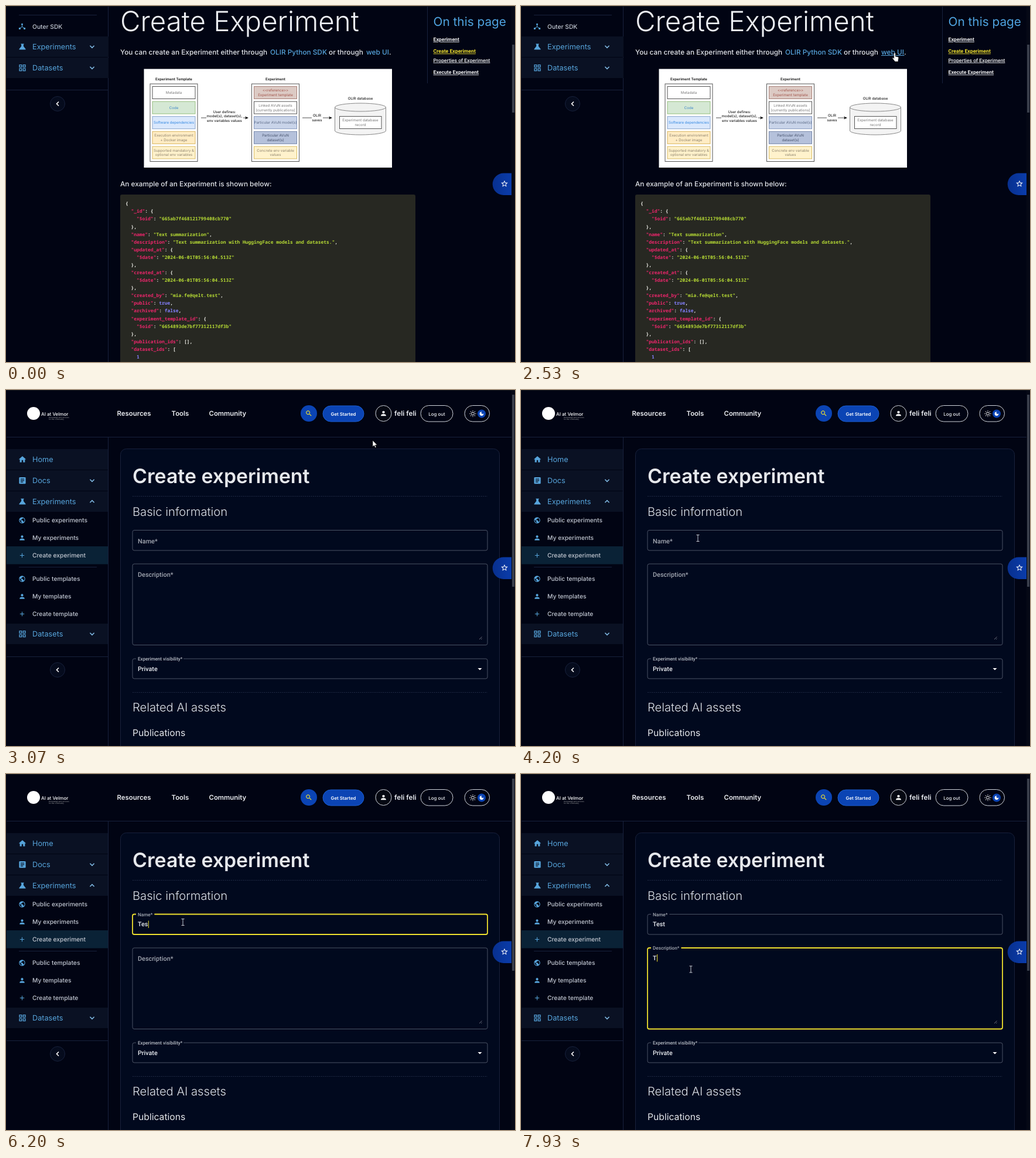
Animation, 869 px wide and 608 px high, one loop 8 s. Source, as an HTML page:

```html
<!DOCTYPE html>
<html lang="en">
<head>
<meta charset="utf-8">
<title>Create experiment</title>
<style>
  html, body { margin: 0; width: 100%; height: 100%; overflow: hidden; background: #02040f; }
  svg { display: block; width: 869px; height: 608px; font-family: Inter, "Open Sans", sans-serif; text-rendering: geometricPrecision; }
  .form { font-family: Roboto, sans-serif; }
  .code { font-family: "Noto Sans Mono", monospace; font-weight: 600; white-space: pre; }
  .mid { text-anchor: middle; }
  .link { text-decoration: underline; }
</style>
</head>
<body>
<svg id="stage" viewBox="0 0 869 608"></svg>
<script>
const PAGE = '#010413', CARD = '#01091e', ROW = '#0a1123', LINE = '#18213c';
const BLUE = '#57a5dc', PALE = '#c3c8d2', YELLOW = '#f0e02f';

const ICONS = {
  home: 'M10 20v-6h4v6h5v-8h3L12 3 2 12h3v8z',
  doc: 'M5 3h14a2 2 0 012 2v14a2 2 0 01-2 2H5a2 2 0 01-2-2V5a2 2 0 012-2zm2 4v2h10V7zm0 4v2h10v-2zm0 4v2h7v-2z',
  flask: 'M20.8 18.4L15 10.7V6.5l1.4-1.7c.2-.3 0-.8-.4-.8H8c-.4 0-.6.5-.4.8L9 6.5v4.2l-5.8 7.7c-.5.7 0 1.6.8 1.6h16c.8 0 1.3-.9.8-1.6z',
  grid: 'M3 3h8v8H3zm2 2v4h4V5zM3 13h8v8H3zm2 2v4h4v-4zM13 3h8v8h-8zm2 2v4h4V5zM13 13h8v8h-8zm2 2v4h4v-4z',
  info: 'M12 2a10 10 0 100 20 10 10 0 000-20zm1 15h-2v-6h2zm0-8h-2V7h2z',
  shapes: 'M12 2l-5.5 9h11zM17.5 13a4.5 4.5 0 100 9 4.5 4.5 0 000-9zM3 13.5h8v8H3z',
  board: 'M3 13h8V3H3zm0 8h8v-6H3zm10 0h8V11h-8zm0-18v6h8V3z',
  scope: 'M5 21a2 2 0 012-2h4v-2H9a4 4 0 01-1.5-7.5L9 12h1l-1 2h9a3 3 0 01-3 3h-2v2h4a2 2 0 012 2zM8 4l4-2 4 9-4 2z',
  play: 'M12 2a10 10 0 100 20 10 10 0 000-20zm-2 14.5v-9l6 4.5z',
  globe: 'M12 2a10 10 0 100 20 10 10 0 000-20zm-1 18c-4-.5-7-3.9-7-8 0-.6.1-1.2.2-1.8L9 15v1a2 2 0 002 2zm6.9-2.6c-.3-.8-1-1.4-1.9-1.4h-1v-3a1 1 0 00-1-1H8v-2h2a1 1 0 001-1V7h2a2 2 0 002-2v-.4c2.9 1.2 5 4 5 7.4 0 2-.8 4-2.1 5.4z',
  person: 'M12 12a4 4 0 100-8 4 4 0 000 8zm0 2c-2.7 0-8 1.3-8 4v2h16v-2c0-2.7-5.3-4-8-4z',
  plus: 'M19 13h-6v6h-2v-6H5v-2h6V5h2v6h6z',
  search: 'M15.5 14h-.8l-.3-.3A6.5 6.5 0 109.5 16c1.6 0 3.1-.6 4.2-1.6l.3.3v.8l5 5 1.5-1.5zm-6 0a4.5 4.5 0 110-9 4.5 4.5 0 010 9z',
  hub: 'M12 2a3 3 0 011 5.8v4l5.5 4.4a3 3 0 11-1.3 1.5L12 13.5l-5.2 4.2a3 3 0 11-1.3-1.5L11 11.8v-4A3 3 0 0112 2z',
  star: 'M22 9.2l-7.2-.6L12 2 9.2 8.6 2 9.2 7.5 14 5.8 21 12 17.3 18.2 21l-1.7-7zM12 15.4l-3.8 2.3 1-4.3-3.3-2.9 4.4-.4L12 6.1l1.7 4 4.4.4-3.3 2.9 1 4.3z',
  moon: 'M12 3a9 9 0 109 9c0-.5 0-.9-.1-1.4A5.4 5.4 0 1113.4 3.1 9 9 0 0012 3z'
};

const text = (x, y, s, size, fill, more = '') => `<text x="${x}" y="${y}" font-size="${size}" fill="${fill}" ${more}>${s}</text>`;
const rect = (x, y, w, h, fill, more = '') => `<rect x="${x}" y="${y}" width="${w}" height="${h}" fill="${fill}" ${more}/>`;
const circle = (x, y, r, fill, stroke = 'none') => `<circle cx="${x}" cy="${y}" r="${r}" fill="${fill}" stroke="${stroke}"/>`;
const path = (d, stroke, more = '') => `<path d="${d}" fill="none" stroke="${stroke}" ${more}/>`;
const icon = (name, x, y, size, fill) =>
  `<path d="${ICONS[name]}" fill="${fill}" fill-rule="evenodd" transform="translate(${x - size / 2} ${y - size / 2}) scale(${size / 24})"/>`;
const weight = n => `font-weight="${n}"`;

// Sidebar
const menuRow = (y, name, label) =>
  rect(1, y - 17.5, 174, 35, ROW) + icon(name, 28, y, 15, BLUE) + text(45, y + 4.7, label, 12.7, BLUE);
const menuItem = (y, name, label) =>
  icon(name, 27.5, y, 12.5, BLUE) + text(45, y + 3.7, label, 10.3, PALE, weight(500));
const chevron = (y, id = '') =>
  `<g transform="translate(147 ${y})">${path('M-3.6-1.8L0 1.8 3.6-1.8', '#7fb8e2', `id="${id}" stroke-width="1.6"`)}</g>`;
const collapser = y => circle(88, y, 12.5, '#050b1d', LINE) + path(`M90 ${y - 3.5}l-3.5 3.5 3.5 3.5`, '#fff', 'stroke-width="1.6"');

// Parts shared by both pages
const frame = (thumbY, thumbH) =>
  rect(863, 1, 5, 607, '#060916') + rect(864, thumbY, 4, thumbH, '#3a3f4c') +
  '<path d="M863 285.5h-13.5a18.7 18.7 0 000 37.5H863z" fill="url(#tab)"/>' + icon('star', 851, 303.5, 14, '#fff');

// Documentation page
const CODE = `{
  "_id": {
    "$oid": "665ab7f468121799408cb770"
  },
  "name": "Text summarization",
  "description": "Text summarization with HuggingFace models and datasets.",
  "updated_at": {
    "$date": "2024-06-01T05:56:04.513Z"
  },
  "created_at": {
    "$date": "2024-06-01T05:56:04.513Z"
  },
  "created_by": "mia.fe@qelt.test",
  "public": true,
  "archived": false,
  "experiment_template_id": {
    "$oid": "6654893de7bf77312117df3b"
  },
  "publication_ids": [],
  "dataset_ids": [
    1`;
const span = (fill, s) => `<tspan fill="${fill}">${s}</tspan>`;
const paint = line => line.replace(/("[^"]*")(:?)|\b(true|false|\d+)\b/g, (all, str, colon, value) =>
  value ? span('#8580ff', value) : span(colon ? '#ee266c' : '#b4d834', str) + colon);
const codeBlock = () => CODE.split('\n').map((line, i) =>
  text(204, 340.3 + i * 13.08, paint(line), 7.95, '#f4f4ee', 'class="code"')).join('');

const label = (x, y, lines, fill = '#222', bold = 500) => lines.split('|').map((s, i, all) =>
  text(x, y + 2.2 + (i - (all.length - 1) / 2) * 7.6, s, 6.15, fill, `class="mid" ${weight(bold)}`)).join('');
const column = (x, title, cells) =>
  label(x, 125, title, '#111', 600) + rect(x - 40.5, 133, 81, 132.5, '#fff', 'stroke="#555"') +
  cells.map(([s, fill, stroke, ink = '#777'], i) =>
    rect(x - 36.5, 137.5 + i * 25.6, 73, 21, fill, `stroke="${stroke}"`) + label(x, 148 + i * 25.6, s, ink, 400)).join('');
const arrow = (x1, x2, x3, x4) =>
  path(`M${x1} 191H${x2}M${x3} 191H${x4}`, '#222', 'stroke-width=".8"') + `<path d="M${x4 + 2} 191l-6-2.5 1.5 2.5-1.5 2.5z"/>`;
const diagram = () =>
  rect(235.5, 107.5, 423.5, 168.5, '#fff') +
  column(286.5, 'Experiment Template', [
    ['Metadata', '#fff', '#555'], ['Code', '#d5e8d4', '#94bd7c', '#3a83c8'],
    ['Software dependencies', '#dae8fc', '#86a3cd', '#2f86e0'],
    ['Execution environment|+ Docker image', '#ffecc4', '#d9b45c', '#8c826c'],
    ['Supported mandatory &amp;|optional env variables', '#fff2cc', '#d9bc66', '#8c826c']]) +
  column(460, 'Experiment', [
    ['&lt;&lt;reference&gt;&gt;|Experiment template', '#dccac4', '#a88078', '#a2554b'],
    ['Linked AVuN assets|(currently publications)', '#fff', '#555'],
    ['Particular AVuN model(s)', '#c9d4e9', '#8497bd', '#5d6c88'],
    ['Particular AVuN|dataset(s)', '#b5c1db', '#7787aa', '#46526c'],
    ['Concrete env variable|values', '#fff2cc', '#d9bc66', '#8c826c']]) +
  arrow(333, 342, 405, 412) + label(373, 188, 'User defines:|model(s), dataset(s),|env variables values') +
  arrow(506, 522, 541, 555) + label(531, 191, 'OLIR|saves') + label(605, 158, 'OLIR database') +
  '<path d="M561.5 173V213A43.5 7 0 00648.5 213V173" fill="#f3f3f3" stroke="#888"/>' +
  '<ellipse cx="605" cy="173" rx="43.5" ry="7" fill="#f3f3f3" stroke="#888"/>' +
  rect(569.5, 188.5, 71.5, 21, '#fff', 'stroke="#555"') + label(605, 199, 'Experiment database|record', '#777', 400);

const prose = (x, y, s, fill = '#e4e6ea') => text(x, y, s, 11.8, fill, weight(500));
const toc = (y, s, fill, bold) => text(729.5, y, s, 8.7, fill, `class="form link" ${weight(bold)}`);
const docsPage = () =>
  path('M22 15.5H155M1 143.5H175M174.5 0V608M719.5 0V132', LINE) +
  menuItem(35, 'hub', 'Outer SDK') + menuRow(69.5, 'flask', 'Experiments') + menuRow(105.5, 'grid', 'Datasets') +
  chevron(69.5) + chevron(105.5) + collapser(167) +
  text(195, 43, 'Create Experiment', 47.4, '#eceef2', weight(300)) +
  prose(195, 82.7, 'You can create an Experiment either through') + prose(451, 82.7, 'OLIR Python SDK', BLUE) +
  prose(551, 82.7, 'or through') + prose(615, 82.7, 'web UI', BLUE) + prose(654, 82.7, '.') +
  path('M615 84.5H654.5', BLUE, 'id="underline"') +
  diagram() + prose(195, 307.5, 'An example of an Experiment is shown below:') +
  rect(195, 322, 504, 300, '#272822', 'rx="3"') + codeBlock() +
  text(729.5, 33.5, 'On this page', 20.8, '#4fa3df') +
  toc(60, 'Experiment', '#eee', 700) + toc(80.3, 'Create Experiment', YELLOW, 700) +
  toc(95.7, 'Properties of Experiment', '#eee', 500) + toc(116.3, 'Execute Experiment', '#eee', 700) + frame(66, 116);

// Form page
const pill = (x, y, w, h, fill, stroke) => rect(x, y, w, h, fill, `rx="${h / 2}" stroke="${stroke}"`);
const sunRays = () => [...Array(8)].map((_, i) =>
  `<path d="M0-4V-5.5" stroke="#fff" transform="translate(797 40.5) rotate(${i * 45})"/>`).join('');
const header = () =>
  path('M1 80.5H863', LINE) + circle(47, 40, 11, '#fff') + text(60, 43.5, 'AI at Velmor', 8, '#fff', weight(500)) +
  text(73, 47.7, 'Knowledge and services', 3, '#aaa') + text(73, 51.3, 'for the community', 3, '#aaa') +
  [[189.5, 'Resources'], [282.5, 'Tools'], [346.5, 'Community']].map(([x, s]) => text(x, 44.3, s, 11.4, '#eceef2', weight(600))).join('') +
  circle(517, 40, 14, '#0b44b4') + icon('search', 517, 40, 13, YELLOW) +
  pill(541, 27, 70, 27, '#0b44b4', '#1c5fd0') + text(576, 43.5, 'Get Started', 7.8, '#fff', 'class="mid" ' + weight(600)) +
  circle(644.5, 40, 13.5, '#050812', '#cfd3da') + icon('person', 644.5, 40, 13, '#fff') +
  text(663, 44.3, 'feli feli', 11.7, '#eceef2', weight(600)) +
  pill(708, 26.5, 55, 27.5, 'none', '#cfd3da') + text(735.5, 43.5, 'Log out', 7.9, '#eceef2', 'class="mid" ' + weight(500)) +
  pill(783, 26.5, 42.5, 27.5, 'none', '#cfd3da') + circle(797, 40.5, 2.4, 'none', '#fff') + sunRays() +
  circle(812, 40.5, 7, '#0b44b4') + icon('moon', 812, 40.5, 9, '#fff');

const sidebar = () =>
  menuRow(118.5, 'home', 'Home') + menuRow(154.5, 'doc', 'Docs') + chevron(154.5, 'docsChevron') +
  '<g id="docsItems">' +
  [['info', 'What is OLIR?'], ['shapes', 'Main concepts'], ['board', 'Experiment Template'], ['scope', 'Experiment'], ['play', 'Experiment Run']]
    .map(([name, s], i) => menuItem(186 + i * 30, name, s)).join('') +
  '</g><g id="experiments">' + rect(1, 172.5, 173, 500, PAGE) +
  menuRow(190.5, 'flask', 'Experiments') + chevron(190.5, 'experimentsChevron') + '<g id="experimentItems">' +
  rect(1, 267, 174, 30.5, '#0a2236') + path('M22 302.5H155', LINE) +
  ['experiment', 'template'].map((noun, i) => [['globe', `Public ${noun}s`], ['person', `My ${noun}s`], ['plus', `Create ${noun}`]]
    .map(([name, s], j) => menuItem(222.5 + i * 100 + j * 30, name, s)).join('')).join('') +
  '</g></g><g id="tail">' + rect(1, 398.5, 173, 220, PAGE) + menuRow(416.5, 'grid', 'Datasets') + chevron(416.5) +
  path('M1 455.5H175', LINE) + collapser(478) + '</g>' + path('M174.5 81V608', LINE);

const field = (id, y, h, name, placeholder) => `<g id="${id}" class="form">` +
  rect(216, y, 606, h, 'none', 'class="box" rx="3"') + rect(222, y - 3, 0, 6, CARD, 'class="notch"') +
  text(0, 0, name, 10.9, '#a4a8b2', 'class="label" ' + weight(500)) +
  text(225, y + 20.7, placeholder, 10.7, '#7d828e', 'class="hint"') +
  text(225, y + 20.7, '', 10.7, '#eceef2', 'class="value" ' + weight(500)) + rect(0, y + 11, 1, 12.5, YELLOW, 'class="caret"') + '</g>';

const formPage = () => rect(0, 0, 869, 608, PAGE) + header() + sidebar() +
  rect(195.5, 100.5, 647, 530, CARD, `rx="10" stroke="${LINE}"`) +
  text(216, 159, 'Create experiment', 33.8, '#e6e8ec', weight(600)) +
  path('M216 181.5H822M216 516.5H822', '#202a44', 'stroke-dasharray="2 1.5"') +
  text(216, 215.3, 'Basic information', 20.2, '#dfe2e8', weight(300)) +
  field('nameField', 239.5, 34.5, 'Name*', 'Name of your experiment') +
  field('aboutField', 297, 138.5, 'Description*', 'Details of your experiment') +
  path('M808 426l4.5-4.5M811 426l1.5-1.5', '#8a8f9a', 'stroke-width=".8"') +
  rect(216, 459, 606, 34, 'none', 'rx="3" stroke="#4b5264"') + rect(222, 456, 81, 6, CARD) +
  text(225, 462, 'Experiment visibility*', 8.1, '#b9bdc6', 'class="form" ' + weight(500)) +
  text(225, 479.5, 'Private', 10.7, '#eceef2', 'class="form" ' + weight(500)) + '<path d="M805.5 475h7l-3.5 3.5z" fill="#fff"/>' +
  text(216, 549.3, 'Related AI assets', 20.2, '#dfe2e8', weight(300)) +
  text(216, 591, 'Publications', 15.7, '#e6e8ec') + frame(8, 328);

const POINTERS = {
  arrow: '<path d="M0 0v11l2.6-2.4 1.8 4 1.7-.8-1.8-3.8h3.4z" fill="#fff" stroke="#000" stroke-width=".6"/>',
  hand: '<path d="M1 0c.8 0 1.3.5 1.3 1.3V6l4.2.9c1 .2 1.4.9 1.2 1.9L7 12.5V15H1.5L-2.7 9.6c-.6-1 .6-1.8 1.4-1.1l1 .9V1.3C-.3.5.2 0 1 0z" fill="#fff" stroke="#000" stroke-width=".6"/>',
  beam: path('M-2.5-5.5h5M0-5.5v11M-2.5 5.5h5', '#c8cbd2')
};

const stage = document.getElementById('stage');
stage.innerHTML = '<defs><linearGradient id="tab"><stop stop-color="#08308f"/><stop offset="1" stop-color="#0a3cab"/></linearGradient></defs>' +
  rect(0, 0, 869, 608, PAGE) + `<g id="docs">${docsPage()}</g><g id="form">${formPage()}</g>` +
  `<g id="pointer">${Object.entries(POINTERS).map(([k, s]) => `<g id="${k}">${s}</g>`).join('')}</g>` + rect(0, 0, 869, 1, '#15171c');

const $ = id => document.getElementById(id);
const show = (el, on) => { el.style.display = on ? '' : 'none'; };
const shift = (el, x, y, more = '') => el.setAttribute('transform', `translate(${x} ${y}) ${more}`);
const ramp = (t, from, to) => Math.min(1, Math.max(0, (t - from) / (to - from)));
const smooth = p => p * p * (3 - 2 * p);

// cubic-bezier(.4, 0, .2, 1)
function standard(x) {
  let lo = 0, hi = 1;
  for (let i = 0; i < 18; i++) {
    const s = (lo + hi) / 2, q = 1 - s;
    if (1.2 * s * q * q + 0.6 * s * s * q + s * s * s < x) lo = s; else hi = s;
  }
  return smooth(lo);
}

const ROUTE = [[0, 637, 80], [3069, 637, 80], [3070, 626, 86], [3870, 309, 229], [4130, 302, 253], [7060, 302, 253], [7190, 290, 333.5], [8000, 290, 333.5]];
function pointerAt(t) {
  const i = ROUTE.findIndex(k => k[0] > t), [t0, x0, y0] = ROUTE[i - 1], [t1, x1, y1] = ROUTE[i];
  const p = smooth(ramp(t, t0, t1));
  return [x0 + (x1 - x0) * p, y0 + (y1 - y0) * p];
}

function setField(id, top, { lift, focused, value, caret }) {
  const part = name => $(id).querySelector('.' + name), box = part('box'), notch = part('notch');
  box.setAttribute('stroke', focused ? YELLOW : '#4b5264');
  box.setAttribute('stroke-width', focused ? 1.8 : 1);
  notch.setAttribute('width', 6 + 0.75 * part('label').getComputedTextLength());
  show(notch, lift > 0);
  shift(part('label'), 225, top + 22.3 - 19 * lift, `scale(${1 - 0.25 * lift})`);
  part('hint').setAttribute('opacity', value ? 0 : lift);
  part('value').textContent = value;
  part('caret').setAttribute('x', 225 + (value ? part('value').getComputedTextLength() + 0.5 : 0));
  show(part('caret'), caret);
}

const within = (t, from, to) => t >= from && t < to;
const typed = (t, word, times) => word.slice(0, times.filter(k => t >= k).length);

function draw() {
  const t = performance.now() % 8000, onForm = t >= 2600;
  show($('docs'), !onForm);
  show($('form'), onForm);
  show($('underline'), t >= 1470);

  const turn = ramp(t, 2520, 2920), open = standard(turn);
  show($('docsItems'), open < 1);
  shift($('experiments'), 0, 190 * (1 - open));
  $('experimentItems').setAttribute('opacity', open * open);
  shift($('tail'), 0, -2 * (1 - open));
  $('docsChevron').setAttribute('transform', `rotate(${180 * (1 - turn)})`);
  $('experimentsChevron').setAttribute('transform', `rotate(${180 * turn})`);

  setField('nameField', 239.5, {
    lift: smooth(ramp(t, 4440, 4590)), focused: within(t, 4440, 7400),
    value: typed(t, 'Test', [5670, 5930, 6130, 6270]),
    caret: within(t, 4870, 5400) || within(t, 5670, 6800)
  });
  setField('aboutField', 297, {
    lift: smooth(ramp(t, 7400, 7550)), focused: t >= 7400,
    value: typed(t, 'T', [7870]), caret: t >= 7550
  });

  const [x, y] = pointerAt(t);
  shift($('pointer'), x, y);
  show($('pointer'), t >= 70);
  show($('hand'), !onForm);
  show($('arrow'), onForm && y <= 240);
  show($('beam'), onForm && y > 240);
  requestAnimationFrame(draw);
}
draw();
</script>
</body>
</html>
```
